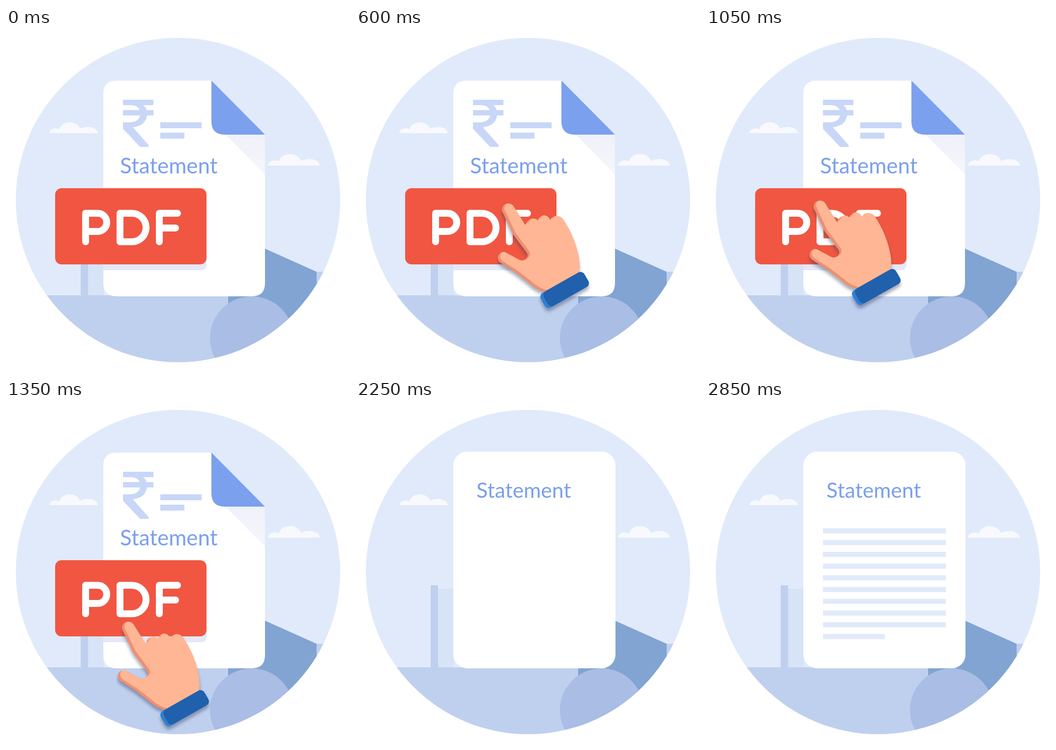
An HTML page for the animation above (3.6 s loop, 700 px wide and 700 px high).

```html
<!DOCTYPE html>
<html lang="en">
<head>
<meta charset="utf-8">
<title>Statement</title>
<style>
  html, body { margin: 0; width: 100%; height: 100%; overflow: hidden; background: #fff; }
  svg { display: block; width: 100%; height: 100%; }
  text { font-family: Lato, "Open Sans", sans-serif; fill: #7b9fee; }
  #hand { filter: drop-shadow(0 7px 3px rgba(50, 60, 90, .42)); }
</style>
</head>
<body>
<svg viewBox="0 0 700 700">
  <defs>
    <clipPath id="disc"><circle cx="350" cy="350" r="330"/></clipPath>
    <path id="cloud" d="M88 214C89 205 100 202 109 206C113 188 144 187 151 205C167 197 186 203 187 214Z"/>
    <path id="skin" d="M394 404C393 387 413 385 419 397L442 434C446 418 462 417 467 424C472 409 488 411 492 423C498 411 514 412 520 424C537 449 552 488 552 519Q551 529 547 538L486 570Q465 566 447 549L421 529L390 509C380 500 388 486 400 488L428 503Q437 508 443 502Q448 496 445 490L416 451Z"/>
    <clipPath id="skinClip"><use href="#skin"/></clipPath>
    <linearGradient id="foldShade" x1="0" y1="0" x2="0" y2="1">
      <stop stop-color="#eff1f9"/><stop offset="1" stop-color="#f6f6fb"/>
    </linearGradient>
  </defs>

  <g clip-path="url(#disc)">
    <rect width="700" height="700" fill="#e0eafa"/>
    <path fill="#d7e3f6" d="M167 384H199V544H167Z"/>
    <path fill="#bfd0ee" d="M152 377H167V544H452V700H0V544H152ZM632 496H700V700H632Z"/>
    <path fill="#81a4d2" d="M452 416L527 449L632 496V700H452Z"/>
    <circle cx="500" cy="631" r="85" fill="#a9bde5"/>
    <g fill="#f8f9fc">
      <use href="#cloud"/>
      <use href="#cloud" transform="translate(533 280) scale(1.07) translate(-88 -214)"/>
    </g>
  </g>

  <g id="cover">
    <path fill="#fff" d="M225 107H418L527 217V519Q527 546 500 546H225Q198 546 198 519V134Q198 107 225 107Z"/>
    <path fill="url(#foldShade)" d="M446 216H527V298Z"/>
    <path fill="#7ba0ee" d="M418 107L527 217H445Q418 217 418 190Z"/>
    <g fill="#c8d7f7">
      <path d="M238 146H300V157H279Q285 161 286 167H300V178H287Q284 199 258 202L290 238V242H273L238 205V192H252Q270 191 273 178H238V167H272Q268 157 254 157H238Z"/>
      <path d="M314 192H398V204H314ZM314 213H363V225H314Z"/>
    </g>
    <text x="232" y="296" font-size="44">Statement</text>
    <path fill="#e4e8f7" d="M198 470H408V481Q408 493 396 493H198Z"/>
    <rect x="100" y="326" width="308" height="155" rx="13" fill="#f15642"/>
    <path fill="none" stroke="#fff" stroke-width="14" stroke-linecap="round" stroke-linejoin="round"
      d="M162 435V377H186.5a18.5 18.5 0 0 1 0 37H162M232 377H256a29 29 0 0 1 0 58H232ZM312 435V377H349M312 407H345"/>
  </g>

  <g id="page">
    <rect x="198" y="105" width="330" height="441" rx="28" fill="#fff"/>
    <text x="245" y="199" font-size="42.7">Statement</text>
    <g id="lines" fill="#e1eafa"></g>
  </g>

  <g id="hand">
    <use href="#skin" fill="#ee8f70"/>
    <g clip-path="url(#skinClip)"><use href="#skin" x="5" y="-3" fill="#ffb694"/></g>
    <g transform="translate(521.5 565) rotate(-29.5)">
      <rect x="-51" y="-17" width="96" height="34" rx="9" fill="#2f80d2"/>
      <rect x="-44" y="-17" width="95" height="34" rx="9" fill="#2160ad"/>
    </g>
  </g>
</svg>
<script>
  const LOOP = 3600, STEP = 150, LINE_COUNT = 10, PAGE_STEP = 15;
  // Hand offset for each step, starting with step 1.
  const handPath = [[60, 24], [0, 0], [-52, -18], [-97, -32], [-135, -38],
                    [-161, -40], [-175, -38], [-168, 19], [-158, 62]];
  const $ = id => document.getElementById(id);
  const show = (node, on) => node.setAttribute("visibility", on ? "inherit" : "hidden");

  const lines = Array.from({ length: LINE_COUNT }, (_, i) => {
    const line = document.createElementNS("http://www.w3.org/2000/svg", "rect");
    const box = { x: 238, y: 261 + i * 23.9, width: i < LINE_COUNT - 1 ? 250 : 126, height: 10.5 };
    for (const key in box) line.setAttribute(key, box[key]);
    return $("lines").appendChild(line);
  });

  function draw(now) {
    const step = Math.floor(now % LOOP / STEP);
    const offset = handPath[step - 1];
    const pageOpen = step >= PAGE_STEP;
    const shownLines = Math.round((step - PAGE_STEP) / 4 * LINE_COUNT);

    show($("cover"), !pageOpen);
    show($("page"), pageOpen);
    lines.forEach((line, i) => show(line, i < shownLines));
    show($("hand"), offset);
    if (offset) $("hand").setAttribute("transform", `translate(${offset})`);
  }

  const start = performance.now();
  function tick() {
    draw(performance.now() - start);
    requestAnimationFrame(tick);
  }
  tick();
</script>
</body>
</html>
```
